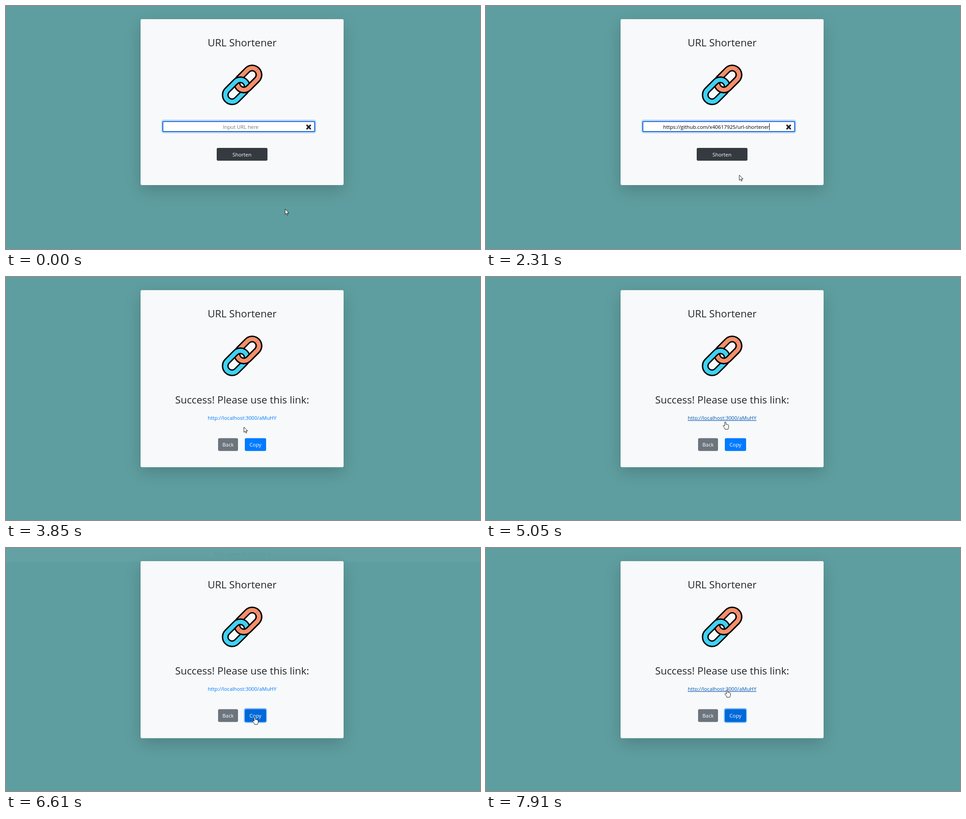
Write an HTML page that moves like this. It is 1046 px wide and 536 px high and loops after 8 s.

```html
<!DOCTYPE html>
<html lang="zh-Hant">
<head>
<meta charset="utf-8">
<title>URL Shortener</title>
<style>
html, body { margin: 0; width: 100%; height: 100%; overflow: hidden; background: #5f9ea0; }
svg { display: block; width: 100%; height: 100%; }
text { font: 11.3px "Open Sans", "Noto Sans", "Noto Sans CJK TC", "Noto Sans CJK", sans-serif; fill: #212529; white-space: pre; }
.mid { text-anchor: middle; }
.big { font-size: 22.4px; }
.lit { fill: #fff; }
#menu text { font-size: 9px; fill: #15141a; }
#menu .off { fill: #a0a0a4; }
#menu tspan { text-decoration: underline; }
.pointer { fill: #fff; stroke: #000; stroke-width: .9; stroke-linejoin: round; }
</style>
</head>
<body>
<svg viewBox="0 0 1046 536" xmlns="http://www.w3.org/2000/svg">
  <defs>
    <filter id="soft" x="-30%" y="-30%" width="160%" height="160%"><feGaussianBlur stdDeviation="18"/></filter>
    <filter id="thin"><feGaussianBlur stdDeviation="1"/></filter>
    <clipPath id="lower"><path d="M455 240L615 80V240Z"/></clipPath>
    <g id="ring" fill="none">
      <rect x="-28" y="-15" width="56" height="30" rx="15" stroke="#000" stroke-width="15"/>
      <rect x="-28" y="-15" width="56" height="30" rx="15" stroke="currentColor" stroke-width="9"/>
    </g>
    <use id="orange" href="#ring" color="#f48f6b" transform="translate(534 161) rotate(-45)"/>
  </defs>

  <rect width="1046" height="536" fill="#5f9ea0"/>
  <rect id="shade" x="297" y="41" width="448" height="366" rx="3" opacity=".175" filter="url(#soft)"/>
  <rect id="card" x="297" y="29" width="448" height="366" rx="3" fill="#f8f9fa"/>
  <text class="mid big" x="521" y="89.3">URL Shortener</text>
  <g id="icon">
    <use href="#orange"/>
    <use href="#ring" color="#3fd2f3" transform="translate(508 187) rotate(-45)"/>
    <g clip-path="url(#lower)"><use href="#orange"/></g>
  </g>

  <g id="form">
    <g id="focus">
      <rect x="343.5" y="251.5" width="340" height="28.5" rx="4" fill="#dcebfb" stroke="#8fbdf0"/>
      <rect x="346" y="254.7" width="335.2" height="22.2" rx="2" fill="#fff" stroke="#0a60d8" stroke-width="2"/>
    </g>
    <rect id="blur" x="345.5" y="254.5" width="336" height="23" rx="2" fill="#fff" stroke="#8f8f9d"/>
    <text id="hint" class="mid" x="518" y="271" style="fill:#757575">Input URL here</text>
    <text id="value" class="mid" x="508" y="271" style="fill:#000">https://github.com/x40617925/url-shortener</text>
    <rect id="caret" y="258.5" width="1" height="15.5"/>
    <path d="M664.2 263.2L671.6 270.8M671.6 263.2L664.2 270.8" stroke="#212529" stroke-width="3.4" stroke-linecap="round"/>
    <rect id="sendRing" x="462.6" y="310.6" width="116.8" height="32.8" rx="5" fill="#52585d" opacity=".5"/>
    <rect id="send" x="465" y="313" width="112" height="28.3" rx="3"/>
    <text class="mid lit" x="520.7" y="332">Shorten</text>
  </g>

  <g id="done">
    <text class="mid big" x="521" y="279">Success! Please use this link:</text>
    <text id="link" class="mid" x="521" y="315">http://localhost:3000/aMuHY</text>
    <rect x="468" y="355.4" width="44" height="28.4" rx="3" fill="#6c757d"/>
    <text class="mid lit" x="490" y="374">Back</text>
    <rect id="copyRing" x="524.8" y="353" width="51.2" height="33" rx="5" fill="#268fff" opacity=".5"/>
    <rect id="copy" x="527" y="355.4" width="47" height="28.4" rx="3"/>
    <text class="mid lit" x="550.4" y="374">Copy</text>
  </g>

  <g id="status">
    <rect x="-1" y="530.2" width="86.5" height="10" fill="#f9f9fb" stroke="#c4cfd0" stroke-width=".7"/>
    <text x="83" y="541" text-anchor="end" style="font-size:9px">localhost:3000/aMuHY</text>
  </g>
  <g id="alert">
    <rect width="1046" height="30.4" fill="#d1ecf1"/>
    <rect y="29.8" width="1046" height=".7" fill="#bee5eb"/>
    <text class="mid" x="521" y="17.3" style="fill:#0c5460">Text copied to clipboard</text>
  </g>
  <g id="menu">
    <rect x="525" y="270" width="140" height="259" opacity=".6" filter="url(#thin)"/>
    <rect x="522.5" y="267.5" width="140.5" height="260" fill="#f9f9fb" stroke="#c8c8cc"/>
    <rect id="hover" x="524" y="361.5" width="137.5" height="21.5" fill="#e0e0e6"/>
  </g>
  <path id="arrow" class="pointer" d="M0 0V11.6L2.7 9.2 4.5 13.3 6.3 12.5 4.6 8.5H8.3Z"/>
  <path id="hand" class="pointer" d="M-1.4 9V1.4a1.4 1.4 0 0 1 2.8 0V5.6c.6-.6 2-.5 2.3.4 .6-.5 1.9-.3 2.1.6 .7-.3 1.6 0 1.6 1.2V11c0 2-1 2.5-1.2 5.2H-.6C-.9 13.6-4 10.8-4.8 9.2-5.2 8-3.5 7.3-2.6 8.2Z"/>
  <path id="beam" d="M-3.2-6.5H-.8L0-6 .8-6.5H3.2M0-6V6M-3.2 6.5H-.8L0 6 .8 6.5H3.2" fill="none" stroke="#000"/>
</svg>
<script>
const LOOP = 8000;
const ui = {};
document.querySelectorAll('[id]').forEach(el => ui[el.id] = el);

// Context menu: label, shortcut, text centre, enabled
const items = [
  ['復原', 'U', 282], ['取消「復原」', 'R', 303.5], ['剪下', 'T', 329], ['複製', 'C', 351],
  ['貼上', 'P', 372, 1], ['刪除', 'D', 394], ['全選', 'A', 415.5],
  ['設為用關鍵字搜尋', 'K', 441, 1], ['檢查拼字', 'G', 466.3, 1],
  ['檢測輔助功能環境屬性', '', 492, 1], ['檢測', 'Q', 513.5, 1]
];
let rows = '';
for (const [label, key, y, on] of items) {
  const tail = key ? ` (<tspan>${key}</tspan>)${key === 'K' ? '...' : ''}` : '';
  rows += `<text class="${on ? '' : 'off'}" x="550" y="${y + 3.3}">${label}${tail}</text>`;
}
for (const y of [316, 428, 453.5, 478.5])
  rows += `<rect x="532" y="${y}" width="121" height="1" fill="#cfcfd3"/>`;
ui.menu.insertAdjacentHTML('beforeend', rows);

// Bursts of activity: start, end, number of steps
const bursts = [
  [70, 70, 1], [260, 1030, 12], [1160, 1900, 10], [1970, 2310, 5], [2510, 2800, 5],
  [3000, 3130, 3], [3720, 3850, 3], [4840, 5260, 7], [6120, 6820, 11], [7560, 7910, 6]
];
// Pointer: time, x, y, shape
const moves = [
  [0, 616, 448, 'arrow'], [190, 616, 448, 'arrow'], [500, 560, 358, 'arrow'],
  [720, 512, 290, 'arrow'], [800, 505, 272, 'beam'], [1030, 522, 266.5, 'beam'],
  [1490, 522, 267, 'beam'], [1540, 524, 276, 'arrow'], [1900, 559, 373, 'arrow'],
  [2440, 559, 373, 'arrow'], [2715, 533, 341, 'hand'], [2800, 525, 331, 'hand'],
  [3780, 525, 331, 'arrow'], [4770, 525, 331, 'arrow'], [5040, 528, 320, 'hand'],
  [5260, 531, 313, 'hand'], [6050, 531, 313, 'hand'], [6120, 532, 325, 'arrow'],
  [6320, 542, 355, 'hand'], [6470, 549, 373, 'hand'], [7490, 549, 373, 'hand'],
  [7560, 544, 352, 'arrow'], [7630, 537, 329, 'arrow'], [7760, 533, 317, 'hand'],
  [7910, 532, 313, 'hand'], [LOOP, 532, 313, 'hand']
];

function snap(t) {
  let at = 0;
  for (const [a, b, n] of bursts) {
    if (t < a) break;
    const gap = n > 1 ? (b - a) / (n - 1) : 1;
    at = Math.min(b, a + Math.floor((t - a) / gap + 1e-6) * gap);
  }
  return at + .5;
}
const ramp = (t, a, b) => Math.max(0, Math.min(1, (t - a) / (b - a)));
const show = (el, on) => el.setAttribute('visibility', on ? 'visible' : 'hidden');
const fade = (el, v) => { el.setAttribute('opacity', v); show(el, v > 0); };
const group = (el, on) => el.setAttribute('display', on ? 'inline' : 'none');

function draw(ms) {
  const t = snap(ms), within = (a, b) => t >= a && t < b;
  const done = t >= 3720, pasted = t >= 1970, focused = t < 3000;

  group(ui.form, !done);
  group(ui.done, done);
  show(ui.icon, !within(3720, 3780));
  ui.card.setAttribute('height', done ? 390.5 : 366);
  ui.shade.setAttribute('height', done ? 390.5 : 366);

  group(ui.focus, focused);
  group(ui.blur, !focused);
  group(ui.hint, !pasted);
  group(ui.value, pasted);
  group(ui.caret, within(70, 570) || within(1070, 2510));
  ui.caret.setAttribute('x', pasted ? 625 : 508);
  group(ui.sendRing, !focused);
  ui.send.setAttribute('fill', t >= 2700 ? '#23272b' : '#343a40');

  fade(ui.menu, pasted ? 0 : ramp(t, 1160, 1400));
  group(ui.hover, t >= 1820);

  const over = within(5040, 6190) || t >= 7750;
  ui.link.style.fill = over ? '#0056b3' : '#007bff';
  ui.link.style.textDecoration = over ? 'underline' : 'none';
  group(ui.status, within(5180, 6190));
  ui.copy.setAttribute('fill', t >= 6320 ? '#0069d9' : '#007bff');
  group(ui.copyRing, t >= 6540);
  fade(ui.alert, ramp(t, 6600, 6820) * (1 - ramp(t, 7640, 7840)));

  let i = 0;
  while (i < moves.length - 2 && moves[i + 1][0] <= t) i++;
  const [a, b] = [moves[i], moves[i + 1]], k = ramp(t, a[0], b[0]);
  const x = a[1] + (b[1] - a[1]) * k, y = a[2] + (b[2] - a[2]) * k;
  for (const name of ['arrow', 'hand', 'beam']) {
    group(ui[name], name === a[3]);
    ui[name].setAttribute('transform', `translate(${x} ${y})`);
  }
}

const start = performance.now();
function tick() {
  draw((performance.now() - start) % LOOP);
  requestAnimationFrame(tick);
}
draw(0);
requestAnimationFrame(tick);
</script>
</body>
</html>
```
